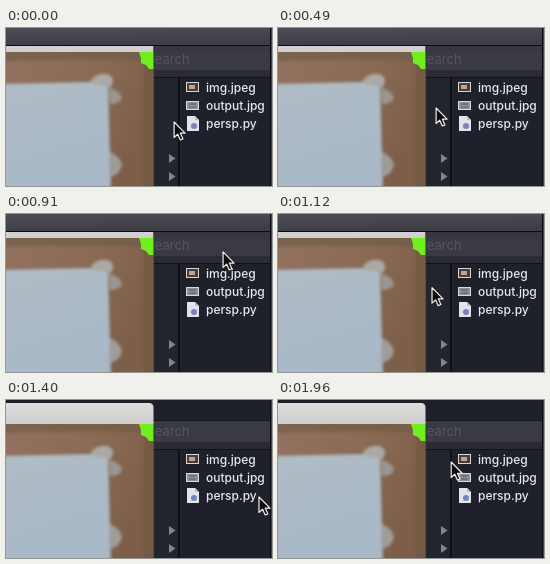
Recreate the animation shown at these times as an HTML page. Size 266 by 158 pixels, loop 2.03 s.

```html
<!DOCTYPE html>
<html lang="en">
<head>
<meta charset="utf-8">
<title>Desktop with circling pointer</title>
<style>
  html, body { margin: 0; width: 100%; height: 100%; overflow: hidden; background: #1e202a; }
  svg { display: block; width: 266px; height: 158px; }
  text { font-family: Inter, "Open Sans", sans-serif; }
  .file { font-size: 12px; font-weight: 500; fill: #e8e8ec; }
</style>
</head>
<body>
<svg viewBox="0 0 266 158">
  <defs>
    <linearGradient id="wood" x2="1" y2="0.35">
      <stop offset="0" stop-color="#927260"/>
      <stop offset="0.55" stop-color="#8b6b54"/>
      <stop offset="1" stop-color="#7d5f49"/>
    </linearGradient>
    <linearGradient id="paper" x2="0.3" y2="1">
      <stop offset="0" stop-color="#b0bcc5"/>
      <stop offset="1" stop-color="#a8b8c7"/>
    </linearGradient>
    <linearGradient id="title" x2="0" y2="1">
      <stop offset="0" stop-color="#dedddd"/>
      <stop offset="1" stop-color="#cfcecd"/>
    </linearGradient>
    <linearGradient id="bar" x2="0.3" y2="1">
      <stop offset="0" stop-color="#4c4d55"/>
      <stop offset="1" stop-color="#3d3e47"/>
    </linearGradient>
    <filter id="soft" x="-10%" y="-10%" width="120%" height="120%"><feGaussianBlur stdDeviation="1.5"/></filter>
    <clipPath id="view"><rect y="24" width="147.5" height="134"/></clipPath>
  </defs>

  <!-- file browser -->
  <rect width="266" height="158" fill="#1e202a"/>
  <rect x="140" y="20" width="124" height="22" fill="#393a43"/>
  <rect x="140" y="20" width="124" height="1" fill="#15161c"/>
  <rect x="140" y="42" width="124" height="7" fill="#2a2b34"/>
  <rect x="140" y="49" width="124" height="1" fill="#111218"/>
  <text x="142" y="36" font-size="13" fill="#555660">search</text>
  <rect x="147" y="50" width="25" height="108" fill="#22242e"/>
  <rect x="172" y="50" width="1.5" height="108" fill="#0a0b10"/>
  <rect x="264" width="1" height="158" fill="#08090d"/>
  <rect x="265" width="1" height="158" fill="#42434b"/>
  <g fill="#84858b">
    <path d="M163 126l6.500 4.500-6.500 4.500z"/>
    <path d="M163 144l6.500 4.500-6.500 4.500z"/>
  </g>

  <g>
    <rect x="180.5" y="54.5" width="12" height="9" fill="#4d3b36" stroke="#d9d6d3"/>
    <rect x="183" y="57" width="6" height="4" fill="#b8a796"/>
    <rect x="180.5" y="73.5" width="12" height="8" fill="#8e9291" stroke="#d9d9d9"/>
    <path d="M183 76h7M183 79h7" stroke="#55585c"/>
    <path d="M181 88h8l4 4v11h-12z" fill="#e2e2ec"/>
    <path d="M189 88v4h4z" fill="#b9bac8"/>
    <circle cx="188" cy="98" r="3" fill="#7684bd"/>
  </g>
  <g class="file">
    <text x="200" y="64">img.jpeg</text>
    <text x="200" y="82">output.jpg</text>
    <text x="200" y="100">persp.py</text>
  </g>

  <!-- picture window -->
  <path d="M0 3h143q4.500 0 4.500 4.500v16.500H0z" fill="url(#title)"/>
  <g clip-path="url(#view)">
    <rect y="24" width="148" height="134" fill="url(#wood)"/>
    <g filter="url(#soft)">
      <path d="M-5 20H150V32Q60 31-5 33z" fill="#6f5b48" opacity=".65"/>
      <path d="M138 36L150 30V162H138z" fill="#6c523f" opacity=".5"/>
      <path d="M-5 56L86 54L102 57L105 162H-5z" fill="url(#paper)"/>
      <path d="M85 52Q93 43 104 47Q110 52 104 60Q97 57 86 56z" fill="#aaa9a6"/>
      <path d="M103 60Q114 62 116 70Q114 76 104 76z" fill="#9c9690"/>
      <path d="M104 124Q114 128 116 137Q114 146 105 149z" fill="#9f9b97"/>
    </g>
    <path d="M133 24H147.500V41H143L140 37L135 35L135 30z" fill="#6ff01c"/>
  </g>

  <!-- toolbar that fades away -->
  <g id="veil">
    <rect width="264" height="17" fill="url(#bar)"/>
    <rect y="17" width="264" height="1" fill="#0b0c10"/>
    <rect x="147.5" y="18" width="116.5" height="6" fill="#363740"/>
  </g>

  <path id="pointer" d="M0 0V15.500L3.600 12.200L6.200 18L8.800 16.900L6.300 11.200H11z"
        fill="#0c0c0e" stroke="#f1f1f1" stroke-width="1.200" stroke-linejoin="round"/>
</svg>
<script>
  const LOOP = 2030, STEP = 70, TURNS = 1080;
  const CENTER = [213, 72], RADIUS = [55, 38];

  // time, angle in degrees, radius factor
  const path = [
    [0, 215.3, 1], [490, 551.9, 1.02], [910, 805.3, 0.9], [1260, 964.2, 1.17],
    [1400, 1037.9, 0.98], [1680, 1124.9, 0.82], [1960, 1240.1, 0.77]
  ];
  const FADE_FROM = 1120, FADE_TO = 1400;

  const pointer = document.getElementById('pointer');
  const veil = document.getElementById('veil');

  function knot(i) {
    const n = path.length, lap = Math.floor(i / n);
    const [t, angle, r] = path[i - lap * n];
    return [t + lap * LOOP, angle + lap * TURNS, r];
  }

  function slope(i, k) {
    const a = knot(i - 1), b = knot(i + 1);
    return (b[k] - a[k]) / (b[0] - a[0]);
  }

  // Cubic Hermite curve through the cyclic knots
  function curve(t, k) {
    let i = path.length - 1;
    while (path[i][0] > t) i--;
    const a = knot(i), b = knot(i + 1);
    const span = b[0] - a[0], u = (t - a[0]) / span, v = 1 - u;
    return v * v * (1 + 2 * u) * a[k] + u * u * (3 - 2 * u) * b[k]
      + span * u * v * (v * slope(i, k) - u * slope(i + 1, k));
  }

  function draw(now) {
    const t = Math.floor((now % LOOP) / STEP) * STEP;
    const angle = curve(t, 1) * Math.PI / 180, r = curve(t, 2);
    const x = CENTER[0] + RADIUS[0] * r * Math.cos(angle);
    const y = CENTER[1] - RADIUS[1] * r * Math.sin(angle);
    pointer.setAttribute('transform', `translate(${x.toFixed(2)} ${y.toFixed(2)})`);
    const shown = (FADE_TO - t) / (FADE_TO - FADE_FROM);
    veil.setAttribute('opacity', Math.min(1, Math.max(0, shown)));
  }

  const start = performance.now();
  function tick() {
    draw(performance.now() - start);
    requestAnimationFrame(tick);
  }
  tick();
</script>
</body>
</html>
```
